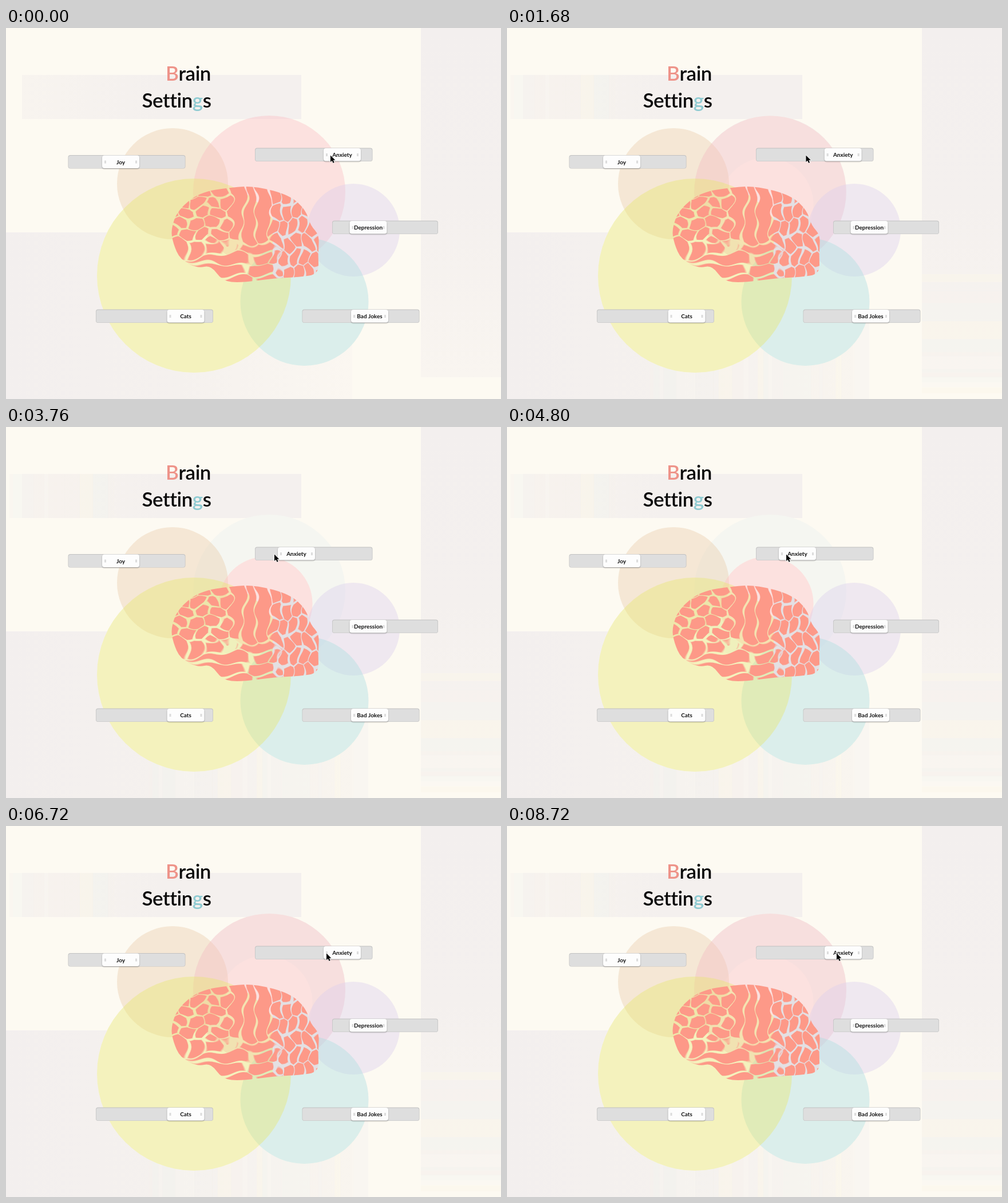
Animation of 865 by 648 pixels, one loop 8800 ms. Source, as an HTML page with a canvas:

```html
<!DOCTYPE html>
<html lang="en">
<head>
<meta charset="utf-8">
<title>Brain Settings</title>
<style>
html, body { margin: 0; width: 100%; height: 100%; overflow: hidden; background: #fdfaf2; }
canvas { display: block; width: 865px; height: 648px; }
</style>
</head>
<body>
<canvas id="stage" width="865" height="648"></canvas>
<script>
const W = 865, H = 648, LOOP = 8800, STEP = 80;
const ctx = document.getElementById('stage').getContext('2d');
const CREAM = '#fdfaf2', CORAL = [253, 153, 136];
const FONT = 'Lato, "Open Sans", sans-serif';

// x, y, radius, colour (laid on at 40%)
const JOY = [291, 272, 97, '#e9caa7'];
const DEPRESSION = [607, 353, 81, '#dacdea'];
const JOKES = [521.5, 478, 112, '#a8dcde'];
const CATS = [328.5, 432.5, 169.5, '#e7e66b'];

const WIDE = { x: 460, y: 286, r: 133, knob: 587.5 };
const TIGHT = { x: 453.5, y: 308.5, r: 82, knob: 507.5 };

// Starts of the slider switches, alternately to the left and to the right
const SWITCHES = [20, 1300, 2900, 5060, 6900, 8260];
const SWITCH_TIME = 450;

// Where the pointer turns: time, x
const TURNS = [
  [0, 567], [960, 483], [1360, 484], [2240, 612], [2560, 562], [2960, 556], [3760, 469],
  [5040, 490], [5360, 641], [6480, 564], [6960, 556], [7840, 483], [8320, 488], [8720, 576], [LOOP, 567]
];

const mix = (a, b, k) => a + (b - a) * k;
const clamp = v => Math.max(0, Math.min(1, v));

function random(seed) {
  return () => (seed = (seed * 16807) % 2147483647) / 2147483647;
}

function surface() {
  const c = document.createElement('canvas');
  c.width = W;
  c.height = H;
  return c;
}

function disc(g, x, y, r, color, alpha = 0.4) {
  g.globalAlpha = alpha;
  g.fillStyle = color;
  g.beginPath();
  g.arc(x, y, r, 0, 7);
  g.fill();
  g.globalAlpha = 1;
}

function fade(g, x, y, w, h, across, ...stops) {
  const f = across ? g.createLinearGradient(x, 0, x + w, 0) : g.createLinearGradient(0, y, 0, y + h);
  stops.forEach((s, i) => f.addColorStop(i / (stops.length - 1), s));
  g.fillStyle = f;
  g.fillRect(x, y, w, h);
}

function stripes(g, x, y, w, h, across, seed) {
  const tints = ['#f6efec', '#eff3ee', '#faf4e6', '#f3efee', '#f8f5f0'];
  const rand = random(seed);
  const size = across ? w : h;
  g.globalAlpha = 0.4;
  for (let p = 0; p < size;) {
    const d = Math.min(size - p, 6 + rand() * 26);
    g.fillStyle = tints[Math.floor(rand() * tints.length)];
    if (across) g.fillRect(x + p, y, d, h);
    else g.fillRect(x, y + p, w, d);
    p += d;
  }
  g.globalAlpha = 1;
}

function makeBackdrop(striped) {
  const c = surface(), g = c.getContext('2d');
  g.fillStyle = CREAM;
  g.fillRect(0, 0, W, H);
  fade(g, 28, 82, 488, 77, true, '#f8f4ef', '#f4f0ee', '#f4f0ee');
  fade(g, 725, 0, 140, 610, false, '#f3efee', '#f4f0ee', '#f9f5f0');
  fade(g, 0, 357, 605, 291, true, '#f3efee', '#f5f1ee', '#fbf7f1');
  if (striped) {
    stripes(g, 6, 82, 184, 77, true, 31);
    stripes(g, 250, 515, 383, 133, true, 77);
    stripes(g, 725, 430, 140, 208, false, 12);
  }
  for (const [x, y, r] of [JOY, DEPRESSION, JOKES, CATS]) disc(g, x, y, r, CREAM, 1);
  return c;
}

// Closed smooth path through the middles of the given corners
function blob(g, text) {
  const p = text.split(' ').map(s => s.split(',').map(Number));
  const mid = (a, b) => [(a[0] + b[0]) / 2, (a[1] + b[1]) / 2];
  g.beginPath();
  g.moveTo(...mid(p[p.length - 1], p[0]));
  p.forEach((a, i) => g.quadraticCurveTo(...a, ...mid(a, p[(i + 1) % p.length])));
  g.closePath();
}

const OUTLINE = '288,352 300,318 338,287 395,278 436,276 496,292 524,318 532,345 548,362 545,395 ' +
  '547,430 512,435 470,437 410,445 378,442 358,414 335,420 304,404 292,376';

// Each lobe: area x, y, w, h and the usual width and height of a fold in it
const LOBES = [
  [286, 278, 104, 108, 27, 19],
  [390, 272, 72, 98, 24, 98],
  [364, 374, 116, 76, 58, 19],
  [462, 280, 90, 160, 19, 27]
];

function makeFolds() {
  const rand = random(2024), folds = [];
  for (const [x, y, w, h, fw, fh] of LOBES) {
    const cols = Math.round(w / fw), rows = Math.round(h / fh);
    for (let r = 0; r < rows; r++) {
      for (let c = 0; c < cols; c++) {
        const shift = rows > 1 ? (r % 2) / 2 - 0.25 : 0;
        folds.push({
          x: x + (c + 0.5 + shift + (rand() - 0.5) * 0.4) * w / cols,
          y: y + (r + 0.5 + (rand() - 0.5) * 0.4) * h / rows,
          fw, fh
        });
      }
    }
  }
  return folds;
}

// Grooves run where two folds are equally near
function makeBrain() {
  const c = surface(), g = c.getContext('2d');
  const left = 286, top = 272, w = 266, h = 176;
  const img = g.createImageData(w, h), folds = makeFolds();
  for (let i = 0; i < w * h; i++) {
    const px = left + i % w, py = top + Math.floor(i / w);
    const x = px + 3 * Math.sin(py / 7) + 2 * Math.sin(py / 17);
    const y = py + 3 * Math.sin(px / 9);
    let near = Infinity, next = Infinity, size = 0;
    for (const f of folds) {
      const d = Math.hypot((x - f.x) / f.fw, (y - f.y) / f.fh);
      if (d < near) {
        next = near;
        near = d;
        size = Math.min(f.fw, f.fh);
      } else if (d < next) next = d;
    }
    const groove = 1.2 + 0.7 * Math.sin(px / 11 + py / 8);
    img.data.set([...CORAL, 255 * clamp((next - near) * size / 2 - groove + 0.5)], i * 4);
  }
  g.putImageData(img, left, top);
  blob(g, OUTLINE);
  g.globalCompositeOperation = 'destination-in';
  g.fill();
  g.globalCompositeOperation = 'destination-over';
  g.clip();
  g.fillStyle = '#e4e0e3';
  g.fillRect(466, top, 100, h);
  return c;
}

function title() {
  const line = (parts, right, y) => {
    let x = right - parts.reduce((w, p) => w + ctx.measureText(p[0]).width, 0);
    for (const [text, color] of parts) {
      ctx.fillStyle = color;
      ctx.fillText(text, x, y);
      x += ctx.measureText(text).width;
    }
  };
  ctx.font = '600 35px ' + FONT;
  ctx.letterSpacing = '-0.5px';
  ctx.textAlign = 'left';
  line([['B', '#ee9389'], ['rain', '#0b0b0b']], 358, 92);
  line([['Settin', '#0b0b0b'], ['g', '#8fcbd2'], ['s', '#0b0b0b']], 358.5, 138.5);
  ctx.letterSpacing = '0px';
}

function box(x, y, w, h, r, color) {
  ctx.fillStyle = color;
  ctx.beginPath();
  ctx.roundRect(x, y, w, h, r);
  ctx.fill();
}

function slider(label, x, y, w, knob) {
  box(x, y, w, 23.5, 4, '#c2c2c2');
  box(x + 0.7, y + 1, w - 1.4, 22, 3.5, '#dedede');
  ctx.save();
  ctx.shadowColor = 'rgba(0,0,0,.35)';
  ctx.shadowBlur = 2;
  ctx.shadowOffsetY = 1;
  box(knob - 32.5, y + 0.5, 65, 22.5, 4, '#fdfdfd');
  ctx.restore();
  for (const d of [-28.5, 25.5]) box(knob + d, y + 9.5, 3, 5, 0.5, '#dcdcdc');
  ctx.font = '700 10px ' + FONT;
  ctx.textAlign = 'center';
  ctx.fillStyle = '#111';
  ctx.fillText(label, knob, y + 15.5);
}

const arrow = new Path2D('M0 0V11.5L2.7 9L4.6 13.3L6.6 12.4L4.8 8.3H8.3Z');

function pointer(t) {
  const i = TURNS.findIndex(p => p[0] > t);
  const [t0, x0] = TURNS[i - 1], [t1, x1] = TURNS[i];
  const k = (t - t0) / (t1 - t0);
  ctx.save();
  ctx.translate(mix(x0, x1, k * k * (3 - 2 * k)), 222.5);
  ctx.fillStyle = '#000';
  ctx.strokeStyle = '#fff';
  ctx.lineWidth = 1.2;
  ctx.stroke(arrow);
  ctx.fill(arrow);
  ctx.restore();
}

// 1 = wide, 0 = tight
function spread(t) {
  const i = SWITCHES.filter(s => s <= t).length - 1;
  if (i < 0) return 1;
  const rest = (1 - clamp((t - SWITCHES[i]) / SWITCH_TIME)) ** 3;
  return i % 2 ? 1 - rest : rest;
}

// Faint trace left around the tight disc
function trace(hole) {
  ctx.fillStyle = '#f5f6f1';
  ctx.beginPath();
  ctx.arc(WIDE.x, WIDE.y, WIDE.r, 0, 7);
  ctx.closePath();
  ctx.moveTo(hole.x + hole.r, hole.y);
  ctx.arc(hole.x, hole.y, hole.r, 0, 7);
  ctx.fill('evenodd');
}

const calm = makeBackdrop(false), worn = makeBackdrop(true), brain = makeBrain();

function draw(t) {
  const k = spread(t);
  const now = {};
  for (const key in WIDE) now[key] = mix(TIGHT[key], WIDE[key], k);

  ctx.drawImage(t < STEP ? calm : worn, 0, 0);
  if (t >= STEP) trace(t < SWITCHES[1] ? now : TIGHT);
  const anxiety = [now.x, now.y, now.r, '#fabbc0'];
  for (const d of [JOY, anxiety, DEPRESSION, JOKES, CATS]) disc(ctx, ...d);

  ctx.drawImage(brain, 0, 0);
  title();
  slider('Joy', 108.5, 222, 205, 200.5);
  slider('Anxiety', 435, 209.5, 205.5, now.knob);
  slider('Depression', 570, 336.5, 185, 633);
  slider('Cats', 157, 491.5, 205, 314);
  slider('Bad Jokes', 517.5, 491.5, 205, 635.5);
  pointer(t);
}

const begin = performance.now();
function tick() {
  const t = Math.max(0, performance.now() - begin) % LOOP;
  draw(Math.floor(t / STEP) * STEP);
  requestAnimationFrame(tick);
}
tick();
</script>
</body>
</html>
```
